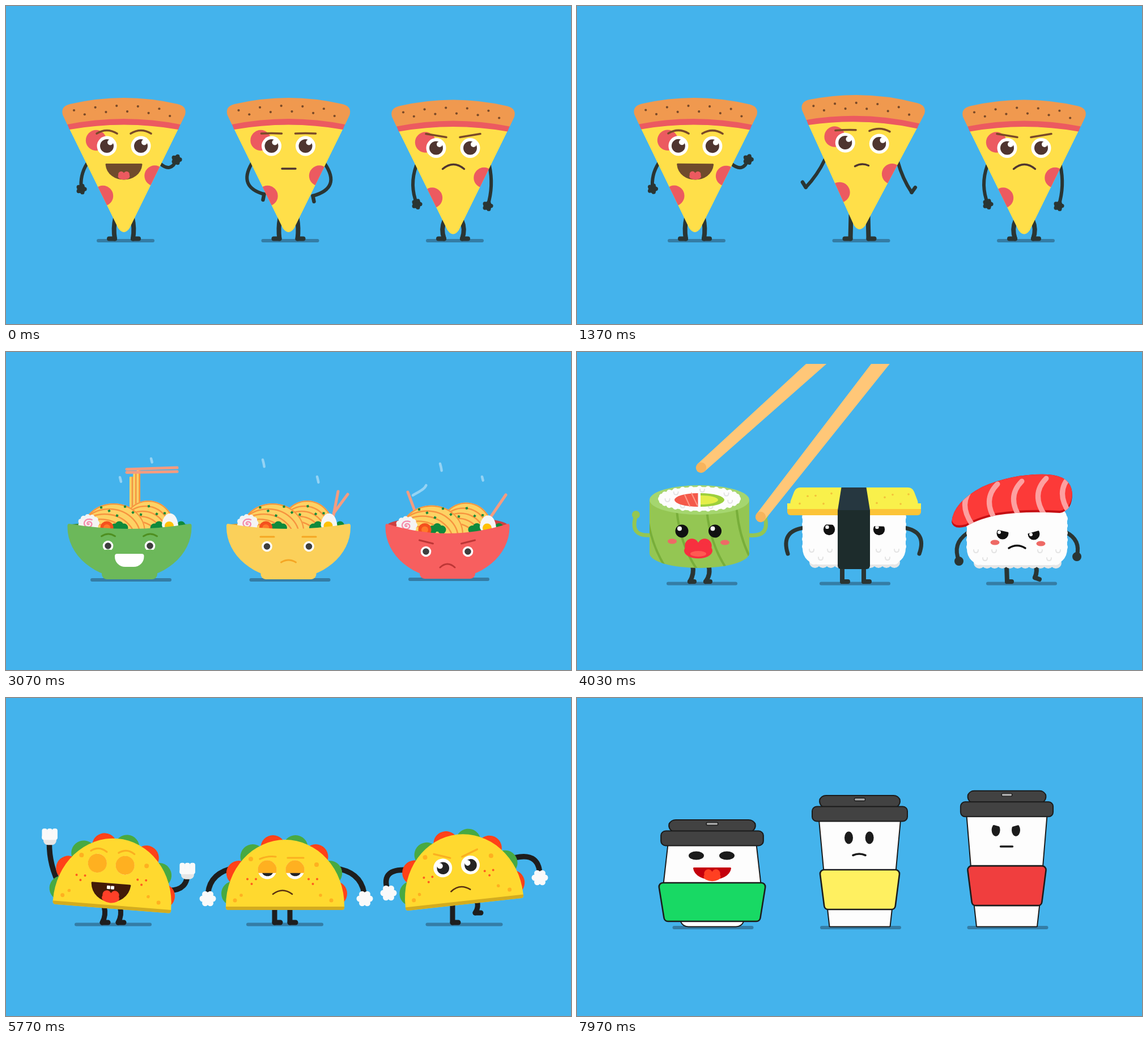
An HTML page with a canvas for the animation above (8000 ms loop, 997 by 561 pixels).

```html
<!DOCTYPE html>
<html lang="en">
<head>
<meta charset="utf-8">
<title>Food moods</title>
<style>
html, body { margin: 0; height: 100%; overflow: hidden; background: #44b3ec; }
canvas { display: block; width: 100vw; height: 100vh; }
</style>
</head>
<body>
<canvas id="stage" width="997" height="561"></canvas>
<script>
const g = document.getElementById('stage').getContext('2d');
const { sin, cos, min, max, PI } = Math;
const SKY = '#44b3ec', DARK = '#2a3533', BLACK = '#1e1e1e', WHITE = '#fdfdfd';
const SIDES = [-1, 1];

// ---- shapes ----
function fill(d, c) { g.fillStyle = c; g.fill(new Path2D(d)); }
function line(d, c, w) {
  g.strokeStyle = c; g.lineWidth = w; g.lineCap = g.lineJoin = 'round';
  g.stroke(new Path2D(d));
}
function oval(x, y, rx, ry, c) {
  g.beginPath(); g.ellipse(x, y, rx, ry, 0, 0, 2 * PI); g.fillStyle = c; g.fill();
}
const dot = (x, y, r, c) => oval(x, y, r, r, c);
function box(x, y, w, h, r, c) {
  g.beginPath(); g.roundRect(x, y, w, h, r); g.fillStyle = c; g.fill();
}
// symmetric trapezoid with half widths a (top) and b (bottom), optionally outlined
function trap(x, y0, y1, a, b, r, c, w) {
  const pts = [[x + a, y0], [x + b, y1], [x - b, y1], [x - a, y0]];
  g.beginPath(); g.moveTo(x, y0);
  pts.forEach((p, i) => g.arcTo(...p, ...(pts[i + 1] || [x, y0]), r));
  g.closePath(); g.fillStyle = c; g.fill();
  if (w) { g.strokeStyle = '#1b1b1b'; g.lineWidth = w; g.stroke(); }
}
const ring = (x, y, rx, ry, n, r, c) => {
  for (let i = 0; i < n; i++) dot(x + rx * cos(i * 2 * PI / n), y + ry * sin(i * 2 * PI / n), r, c);
};
const row = (x0, x1, y0, y1, n, r, c) => {
  for (let i = 0; i < n; i++) dot(mix(x0, x1, i / (n - 1)), mix(y0, y1, i / (n - 1)), r, c);
};
function at(x, y, rot, sx, sy, draw) {
  g.save(); g.translate(x, y); g.rotate(rot); g.scale(sx, sy); draw(); g.restore();
}
const move = (x, y, draw) => at(x, y, 0, 1, 1, draw);
const turn = (x, y, rot, sy, draw) => at(x, y, rot, 1, sy, () => move(-x, -y, draw));
function clip(d, draw) { g.save(); g.clip(new Path2D(d)); draw(); g.restore(); }

// ---- body parts ----
const shadow = (x, y, half) => line(`M${x - half},${y}h${2 * half}`, '#347da6', 6);
// bend pushes the middle sideways by a share of the length
function limb(x0, y0, [x1, y1, bend], c, w) {
  const dx = x1 - x0, dy = y1 - y0;
  line(`M${x0},${y0}Q${x0 + dx / 2 - dy * bend},${y0 + dy / 2 + dx * bend} ${x1},${y1}`, c, w);
}
function leg(x0, y0, x1, y1, bend, c, w, toe = 10, dip = 0) {
  limb(x0, y0, [x1, y1, bend], c, w);
  line(`M${x1},${y1}l${toe},${dip}`, c, w);
}
// brows and mouths: tilt lifts the right end, arch lifts the middle
const curve = (x, y, half, tilt, arch, c, w) =>
  line(`M${x - half},${y + tilt}Q${x},${y - arch} ${x + half},${y - tilt}`, c, w);
function smile(x, y, half, depth, c) {
  const d = `M${x - half},${y}h${2 * half}c${-half * .12},${depth * 1.33} ${-half * 1.88},${depth * 1.33} ${-2 * half},0Z`;
  fill(d, c); line(d, c, 3);
}
function tongue(x, y, r, c) {
  for (const s of SIDES) dot(x + s * r * .45, y - r * .25, r * .5, c);
  oval(x, y + r * .1, r, r * .55, c);
}

// ---- timing ----
const ease = u => u * u * (3 - 2 * u);
const mix = (a, b, u) => Array.isArray(a) ? a.map((v, i) => mix(v, b[i], u)) : a + (b - a) * u;
// key(t, time, value, time, value, ...)
function key(t, ...k) {
  let i = 0;
  while (i < k.length - 2 && t >= k[i + 2]) i += 2;
  if (i >= k.length - 2 || t <= k[0]) return k[i + 1];
  return mix(k[i + 1], k[i + 3], ease((t - k[i]) / (k[i + 2] - k[i])));
}

// ---- pizza ----
const BROWN = '#7a4a28', PINK = '#ec5a60';
const CHEESE = 'M112,217Q208,201 304,217L218,392Q208,406 198,392Z';

function slice({ x, y, rot, bow, arms, stub, brows, mouth }) {
  move(x, 0, () => {
    shadow(211, 414, 48);
    SIDES.forEach(s => leg(208 + 15 * s, 374 + y, 208 + 16 * s, 410.5, -s * bow, DARK, 8, 10 * s));
    move(0, y, () => turn(208, 396, rot, 1, () => {
      arms.forEach((hand, i) => {
        const [hx, hy] = hand;
        limb(i ? 272 : 143, 278, hand, DARK, 6);
        if (stub) return line(`M${hx},${hy}l${SIDES[i] * stub[0]},${stub[1]}`, DARK, 6.5);
        dot(hx, hy, 7.5, DARK);
        ring(hx, hy, 6, 6, 5, 3.6, DARK);
      });
      fill(CHEESE, '#ffdf49');
      clip(CHEESE, () => {
        dot(159, 237, 18.2, PINK); dot(171, 335, 18.2, PINK); dot(262.5, 299.5, 18.2, PINK);
      });
      fill('M108,208Q208,188 308,208L304,218Q208,201 112,218Z', PINK);
      fill('M113,173Q208,151 303,173Q320,177 316,192L308,209Q208,189 108,209L100,192Q96,177 113,173Z', '#f0994f');
      for (let i = 0; i < 10; i++) dot(120 + 18.8 * i, 184 + 10 * (i % 2) - 8 * sin(PI * i / 9), 2.1, BROWN);
      SIDES.forEach((s, i) => {
        const ex = 208 + 30 * s;
        dot(ex, 247, 17.5, '#fff');
        dot(ex, 247, 12, '#4f3530');
        dot(ex + 6, 240.5, 5, '#fff');
        curve(ex, 225, 18, ...brows[i], BROWN, 3.6);
      });
      if (mouth) return curve(208.5, ...mouth, '#4f3530', 3.4);
      smile(208, 279.5, 31, 25.5, '#6f4b2c');
      tongue(208, 299.5, 10.5, PINK);
    }));
  });
}
function pizzas(t) {
  t = min(t, 1670);
  const wave = sin(t / 1670 * 6 * PI);
  const shrug = key(t, 0, 0, 350, 0, 720, 1.6, 950, 1, 1400, 1, 1670, 0);
  const hop = key(t, 0, 0, 160, .2, 400, 1, 700, 0);
  slice({
    x: 0, y: 0, rot: key(t, 0, 0, 420, -.06, 860, .004, 1370, .006, 1670, 0), bow: .1,
    arms: [[133, 323, .18], [301 + 2 * wave, 271 - 4 * wave, .7]],
    brows: [[0, 11], [0, 11]]
  });
  slice({
    x: 290.5, y: -5 * shrug, rot: .032 * shrug, bow: .08 * (1 - shrug),
    arms: mix([[165, 332, .65], [251, 335, -.7]], [[111, 328, -.08], [298, 331, .08]], shrug),
    stub: mix([2, 10], [6, -9], shrug),
    brows: [[shrug, 1], [0, 1 + 8 * shrug]],
    mouth: [287, 12, shrug, 6 * shrug]
  });
  slice({
    x: 581, y: 3.5 - 11 * hop, rot: .06 * hop, bow: .2 * (1 - hop),
    arms: [[144, 346 - 12 * hop, .19], [269, 349 - 12 * hop, -.13]],
    brows: [[-3, 0], [3, 0]],
    mouth: [284, 19, 0, 16]
  });
}

// ---- ramen ----
const GREEN = '#0f8a3c', NOODLE = '#fdd264', BROTH = '#f7943f';

function steam(x, top, u, slant = 0) {
  const tail = max(0, 1.6 * u - .6), head = min(1, 1.6 * u);
  let d = 'M';
  for (let i = 0; i <= 10; i++) {
    const v = mix(tail, head, i / 10);
    d += `${i ? 'L' : ''}${x + slant * v - 3 * sin(v * 2 * PI)},${top + 70 * (1 - v) * (slant ? .42 : 1)}`;
  }
  line(d, '#94d3f4', 4.5);
}
function mound(x, y, rx, ry, shift) {
  oval(x, y, rx, ry, NOODLE);
  g.save();
  g.beginPath(); g.ellipse(x, y, rx, ry, 0, 0, 2 * PI); g.clip();
  g.strokeStyle = BROTH; g.lineWidth = 2.6;
  for (let i = 0; i < 5; i++) {
    g.beginPath(); g.ellipse(x - shift * i, y + 9 * i, rx - 1, ry - 1, 0, 0, 2 * PI); g.stroke();
  }
  g.restore();
}
function toppings() {
  mound(251, 312, 47, 50, 5);
  mound(190, 317, 56, 50, 8);
  for (let i = 0; i < 9; i++) at(168 + 14 * i, 281 + 9 * sin(2.2 * i + 4), i, 1, 1, () => box(-2, -2, 4, 4, 0, '#178a3a'));
  for (const [x, n] of [[192, 3], [262, 3], [301, 2]])
    for (let i = 0; i < n; i++) dot(x + 8 * i, 310 - 4 * (i % 2), 7.5, GREEN);
  dot(178, 310, 11.5, '#f4511e');
  dot(178, 310, 6, '#ff7a2a');
  ring(146, 302, 14, 11, 11, 5, '#f4f4f4');
  oval(146, 303, 15, 13, '#f4f4f4');
  let swirl = 'M';
  for (let a = 0; a < 12; a += .4) swirl += `${a ? 'L' : ''}${146 + .85 * a * cos(a)},${303 + .75 * a * sin(a)}`;
  line(swirl, '#f58cab', 2.3);
  fill('M275,305C277,280 301,276 304,306Q302,315 290,315Q276,315 275,305Z', '#f6f6f6');
  dot(288, 307, 8, '#ffc107');
}
function bowl({ x, color, inner, ink, tilt, eyeY, tilts, arch, sticks = [], lift }) {
  const stick = (x0, y0, x1, y1) => line(`M${x0},${y0}L${x1},${y1}`, '#f59c80', 5);
  move(x, 0, () => {
    shadow(220.5, 402 - tilt, 68.5);
    oval(218, 305, 105, 4 + 10 * tilt, inner);
    sticks.forEach(s => stick(...s));
    if (lift !== undefined) {
      for (let i = 0; i < 3; i++) {
        const top = 220 + lift - 6 * i, sx = 218 + 6.3 * i;
        box(sx, top, 6.3, 275 - top, 1, NOODLE);
        box(sx + 3.6, top, 2.7, 275 - top, 0, BROTH);
      }
      stick(213, 207 + lift, 302, 204 + lift);
      stick(213, 212.5 + lift, 302, 211 + lift);
    }
    move(0, 3.5 * tilt, toppings);
    box(169, 380, 98, 21 - tilt, [0, 0, 9, 9], color);
    fill(`M111,303Q218,${321 + 16 * tilt} 325,303Q328,303 327.500,309A109.500,91 0 0 1 108.500,309Q108,303 111,303Z`, color);
    SIDES.forEach(s => {
      const ex = 217 + 37 * s;
      dot(ex, eyeY, 9.3, '#fff');
      dot(ex, eyeY, 5.8, '#3e3e3e');
      if (lift !== undefined) oval(ex, eyeY + 10, 10, 3.5, color);
      curve(ex + .5, eyeY - 17, 12, s * tilts, arch, ink, 3);
    });
    if (lift !== undefined) return box(192, 356, 51.5, 23, [4, 4, 18, 18], '#fff');
    curve(218, eyeY + 28, 13, 0, 8 + 4 * tilt, ink, 3);
  });
}
function ramen(t) {
  t = min(t, 1640);
  const u = p => (t / 1000 + p) % 1;
  const tilt = key(t, 0, 0, 400, 1, 1300, 1, 1640, 0);
  bowl({
    x: 0, color: '#6cb85a', inner: '#3f8a34', ink: '#4e8f20', tilt: 0, eyeY: 342, tilts: 0, arch: 8,
    lift: key(t, 0, 48, 450, 4, 820, 40, 1240, 0, 1640, 40)
  });
  bowl({
    x: 280.5, color: '#fbd05a', inner: '#d99a2e', ink: '#f5a623', tilt: 0, eyeY: 343, tilts: 0, arch: 0,
    sticks: [[305.5, 246, 297, 290], [322.5, 251, 298, 284]]
  });
  bowl({
    x: 561, color: '#f75f5f', inner: '#cc4040', ink: '#bd3636', tilt, eyeY: 343 + 9 * tilt, tilts: 3, arch: 0,
    sticks: [[148, 247, 161, 282], [321, 252, 295, 290]]
  });
  steam(256, 188, u(.7)); steam(201, 221, u(.69));
  steam(453, 190, u(.65)); steam(549, 220, u(.67));
  steam(766, 197, u(.65)); steam(840, 220, u(.7));
  steam(708, 234, u(.36), 34);
}

// ---- sushi ----
const LIME = '#94c653', BLUSH = '#ee6a66';
const cheeks = (x, y, half) => SIDES.forEach(s => oval(x + s * half, y + s, 8, 4.5, BLUSH));
const grain = (x, y) => line(`M${x},${y}q0,5 4,5q4,0 4,-5`, '#e4e4e4', 2);
const eye = (x, y, r, shine) => { dot(x, y, r, '#111'); dot(x - r * .35, y - r * .4, shine, '#fff'); };

function riceBlock(x, y, w, h) {
  const end = y + h;
  row(x + 22, x + w - 20, end - 4, end - 4, 11, 10, '#e6e6e6');
  box(x, y, w, h, 28, WHITE);
  row(x + 20, x + w - 20, end - 9, end - 9, 11, 9, WHITE);
  for (const side of [x + 6, x + w - 6]) row(side, side, y + 26, end - 32, 5, 7, WHITE);
  for (const side of [x + 12, x + w - 52]) for (let i = 0; i < 3; i++) grain(side + 16 * i, end - 27 + 14 * (i % 2));
}
function roll(b) {
  shadow(220.5, 408.5, 59.5);
  leg(204, 376, 199, 405, -.2, DARK, 8, 8);
  leg(232, 376, 227, 405, -.25, DARK, 8, 8);
  turn(216, 405, .012 * b, 1 + .015 * b, () => {
    const side = 'M128,261V355A88,26 0 0 0 304,355V261Z';
    for (const [x, hx, bend] of [[131, 104 - 7 * b, -.75], [302, 331 + 6 * b, .75]]) {
      limb(x, 323, [hx, 289, bend], LIME, 7);
      dot(hx, 287, 7, LIME);
    }
    fill(side, LIME);
    clip(side, () => {
      for (let i = 0; i < 4; i++) line(`M${123 + 53 * i},280q6,60 36,104`, '#78ae3a', 4);
    });
    oval(216, 261, 88, 26, '#a5d66f');
    oval(216, 259, 72, 21, WHITE);
    ring(216, 259, 68, 18, 28, 5, WHITE);
    for (let i = 0; i < 7; i++) grain(212 + 57 * cos(i * .9 + 3), 257 + 15 * sin(i * .9 + 3));
    clip('M170,240h43.500v40H170Z', () => {
      oval(214, 261, 42, 12, '#f4594a');
      line('M190,252l9,20M202,249l10,21', '#ff9a88', 2);
    });
    clip('M218,240h52v40h-52Z', () => {
      oval(218, 261, 42, 12, '#9ccf3c');
      oval(218, 261, 31, 8, '#e4ee4a');
    });
    eye(185, 316, 11.5, 4); eye(243.5, 316, 11.5, 4);
    cheeks(214.5, 335, 46.5);
    tongue(214, 348, 25, '#f7303f');
    oval(214, 356, 14, 5, '#ff5a52');
  });
}
function tamago(m) {
  shadow(490.5, 408.5, 59.5);
  leg(468, 376, 468, 405, 0, DARK, 8);
  leg(506, 376, 506, 405, 0, DARK, 8);
  turn(489, 405, 0, 1 + .006 * m, () => {
    SIDES.forEach(s => limb(489 + 88 * s, 310, [488 + (116 - 3 * m) * s, 356, -.6 * s], DARK, 7));
    riceBlock(398, 265, 182, 110);
    trap(489, 239, 278, 103, 118, 12, '#f9f04b');
    box(371, 267, 236, 11, 0, '#f9f04b');
    box(371, 277, 236, 11, [0, 0, 6, 6], '#fcc438');
    for (let i = 0; i < 5; i++) SIDES.forEach(s => dot(489 + s * (40 + 14 * i), 258 + 10 * sin(2.3 * i + s), 1.8, '#f3c13a'));
    trap(488.5, 239, 279.5, 22, 28.5, 0, '#263740');
    box(460, 279, 57, 104, [0, 0, 6, 6], '#1d2c2c');
    clip('M430,304L550,308V330H430Z', () => { eye(445, 313, 10.2, 3.2); eye(533, 313, 10.2, 3.2); });
  });
}
function salmon(b, m) {
  const lift = max(0, cos(b * PI / 2)), handX = 882 + 7 * b;
  const fish = 'M661,300Q664,265 715,238Q770,214 830,216Q872,218 874,250Q874,280 852,284Q790,280 740,288Q705,296 686,308Q664,314 661,300Z';
  shadow(784.5, 408.5, 59.5);
  leg(758, 376, 759, 405, 0, DARK, 8, 8);
  leg(809, 374, 808, 405 - 7 * lift, -.2, DARK, 8, 8, 3 * lift);
  turn(776, 400, .008 * b, 1, () => {
    limb(688, 320, [674, 368, .4], DARK, 7); dot(674, 369, 8, DARK);
    limb(863, 318, [handX, 360, -.4], DARK, 7); dot(handX, 361, 8, DARK);
    riceBlock(688, 268, 177, 108);
    fill(fish, '#c50f14');
    clip(fish, () => {
      move(0, -4, () => fill(fish, '#fc3a38'));
      for (let i = 0; i < 5; i++) line(`M${699 + 43 * i},${238 - 5 * i}q-28,28 -2,66`, '#fda0a0', 9);
    });
    clip('M735,312L766,319L790,322L822,313V336H735Z', () => {
      eye(751, 320, 10.5, 0); eye(806, 321, 10.5, 0);
      dot(745 + m, 318, 3, '#fff'); dot(801 + m, 322, 3, '#fff');
    });
    cheeks(778, 337, 40.5);
    curve(776.5, 346, 14.5, 0, 9, '#111', 3.4);
  });
}
function chopstick(x, y, rot, off) {
  at(x, y, rot, 1, 1, () => move(0, -330 * off, () => {
    trap(0, -800, 0, 18, 9, 0, '#ffc778');
    dot(0, 0, 9.2, '#f8b45c');
  }));
}
function sushi(t) {
  const b = sin((min(t, 1630) - 430) / 400 * PI), m = sin((min(t, 1830) - 430) / 350 * PI);
  const off = key(t, 0, 1, 400, 0, 1050, 0, 1600, 1);
  roll(b);
  tamago(m);
  salmon(b, m);
  clip('M0,21H997V561H0Z', () => {
    chopstick(219, 204, .837, off);
    chopstick(324, 291, .664, off * 1.1);
  });
}

// ---- taco ----
const GOLD = '#ffb020';
const SHELL = 'M392,374Q387,374 388,366A104.500,116 0 0 1 597,366Q598,374 593,374Z';

function glove(x, y, up) {
  if (!up) {
    dot(x, y, 11, '#fafafa');
    return ring(x, y, 9, 9, 6, 5.5, '#fafafa');
  }
  box(x - 11, y - 4, 23, 19, 8, '#e6e6e6');
  for (let i = 0; i < 3; i++) box(x - 13.5 + 9 * i, y - 14, 9.5, 20, 4, '#fafafa');
  box(x - 13.5, y - 3, 26, 9, 4, '#fafafa');
}
function filling() {
  for (let i = 0; i < 8; i++) {
    const a = PI * (1 - i / 7);
    dot(491 + 89 * cos(a), 345 - 83 * sin(a), 22, i % 2 ? '#ff4218' : '#48a942');
  }
}
function tacoFace({ face, lid, brows, happy }) {
  SIDES.forEach((s, i) => {
    const x = 485.5 + 24.5 * s;
    dot(x, face, 16.5, '#fff');
    dot(x + .5, face + .5, 10.8, '#242424');
    dot(x - 4.5, face - 4, 5, '#fff');
    clip(`M${x - 18},${face - 17}h36v${34 * lid}h-36Z`, () => dot(x, face, 16.7, GOLD));
    curve(x + 1, face - 21, 14, ...brows[i], '#fbaf20', 3.2);
  });
  if (!happy) return curve(488, face + 43, 17, 0, 13, '#5a3010', 2.6);
  smile(488, face + 35, 33.5, 30, '#431a08');
  for (const x of [481, 488]) box(x, face + 38, 6, 6, 1, '#fff');
  tongue(489, face + 58, 15.5, '#ff4028');
}
function taco(o) {
  const { x, y, rot, arms, happy } = o, drop = happy ? 40 : 72;
  shadow(o.ground, 399.5, 65);
  o.legs.forEach(l => leg(...l, BLACK, 9));
  // shoulders follow the body
  arms.forEach((hand, i) => limb(
    x + 98 * SIDES[i] * cos(rot) + drop * sin(rot), y - drop * cos(rot) + 98 * SIDES[i] * sin(rot), hand, BLACK, 9.5));
  at(x, y, rot, 1, 1, () => move(-492, -374, () => {
    filling();
    fill(SHELL, '#ffd92f');
    clip(SHELL, () => box(380, 368, 225, 8, 0, '#d3ac1f'));
    SIDES.forEach(s => {
      dot(490 + 58 * s, 289 + 5 * s, 4, GOLD);
      dot(489 + 85 * s, 357, 3.5, GOLD);
      dot(485 + 70 * s, 348, 2.8, GOLD);
      for (let i = -1; i < 2; i++) dot(487.5 + 54 * s + 7.5 * i, 328 - 8.5 * i * i, 2, '#ff5a1f');
    });
    tacoFace(o);
  }));
  arms.forEach(([hx, hy]) => glove(hx, hy, happy));
}
function tacos(t) {
  const sway = .5 - .5 * cos((t - 150) / 390 * PI);
  const hips = key(t, 0, 0, 350, 0, 850, 1, 1450, 1, 1800, 0);
  const stomp = key(t, 0, 1, 200, 1, 420, 0, 760, 0, 980, 1, 1080, 1, 1250, 0);
  const hipX = mix(3, 12, sway), knee = mix(-.2, -.3, sway);
  taco({
    ground: 189, happy: true, x: mix(186, 192, sway), y: mix(371.5, 375, sway), rot: mix(.08, -.065, sway), face: 296,
    lid: key(t, 0, 0, 110, 1, 210, 1, 330, 0),
    legs: [[170 + hipX, 368, 170, 396, knee], [198 + hipX, 368, 198, 396, knee]],
    arms: mix([[77, 244, -.13], [320, 305, .55]], [[65, 285, -.3], [305, 253, .2]], sway),
    brows: [[0, 10], [0, 10]]
  });
  taco({
    ground: 492, x: 492, y: 374 - 8 * hips, rot: 0, face: 303 - 7.5 * hips,
    lid: key(t, 0, .25, 150, .67, 330, .67, 550, .25),
    legs: [[474, 364, 474, 396, 0], [501, 364, 501, 396, 0]],
    arms: mix([[356, 354, .38], [633, 354, -.38]], [[388, 343, .9], [593, 342, -.95]], hips),
    brows: [[2 + 3 * hips, 4], [0, 0]]
  });
  const lifted = mix([818, 368, 822, 396, 0], [831, 358, 828, 379, -.25], stomp);
  taco({
    ground: 808.5, x: mix(806, 809, stomp), y: mix(374, 364, stomp), rot: mix(.018, -.11, stomp), face: 306, lid: 0,
    legs: [[788, 360, 788, 396, 0], lifted],
    arms: mix([[676, 369, .2], [942, 375, -.18]], [[675, 344, .75], [942, 317, -.65]], stomp),
    brows: [[-5, 0], [5, 0]]
  });
}

// ---- coffee cups ----
const INK = '#1b1b1b', LID = '#424242';
// q above 0 squashes, below 0 stretches
function cup(x, q, color, face) {
  const p = max(q, 0), n = min(q, 0);
  const top = 215 + 43 * q, sleeve = 303 + 23 * p + 36 * n, half = 71 + 24 * p + 5 * n;
  move(x, 0, () => {
    shadow(1.5, 405, 68.5);
    trap(0, 345, 403.5, 60 + 18 * p, 53.5 - 2 * p, 1 + 14 * p, WHITE, 2);
    trap(0, top, sleeve + 20, 72 + 6 * p + 5 * n, 62 + 26 * p, 1, WHITE, 2);
    trap(0, sleeve, sleeve + 70 - 2 * p, half, half - 9 - 2 * p, 7, color, 2.6);
    at(0, 43 * q, 0, 1 + .075 * p + .15 * n, 1, () => {
      trap(0, 172, 194, 68, 76, 12, LID, 2);
      trap(0, 191.5, 217.5, 84, 84, 8, LID, 2);
      trap(0, 176.5, 181.5, 9.5, 9.5, 2, '#aaa', 1.4);
    });
    face(p);
  });
}
function cups(t) {
  cup(238.5, key(t, 0, 0, 280, -.18, 570, 1), '#18d964', p => {
    SIDES.forEach(s => oval(-1 + s * (18.5 + 8.5 * p), 246 + 32 * p, 7.5 + 6 * p, 11 - 3.5 * p, INK));
    at(0, 257 + 43 * p, 0, .8 + .2 * p, 1, () => {
      smile(0, .5, 32, 18.5, '#c4000c');
      tongue(0, 13.5, 15, '#ff4022');
    });
  });
  cup(499, 0, '#fff060', () => {
    SIDES.forEach(s => oval(-1.2 + 18.3 * s, 246.5, 7.5, 11, INK));
    curve(-1, 277.5, 11, 0, 5, INK, 3.6);
  });
  cup(758.5, key(t, 0, 0, 350, -.19), '#f03e3e', () => {
    clip('M-34,221L-1,230L32,221V250H-34Z', () => SIDES.forEach(s => oval(-1.7 + 17.7 * s, 233, 7.5, 11, INK)));
    curve(-.5, 262, 10.5, 0, 0, INK, 3.4);
  });
}

const scenes = [[0, pizzas], [1830, ramen], [3600, sushi], [5600, tacos], [7400, cups]];
function frame() {
  const t = performance.now() % 8000;
  const [start, draw] = scenes.filter(s => s[0] <= t).pop();
  g.fillStyle = SKY;
  g.fillRect(0, 0, 997, 561);
  draw(t - start);
  requestAnimationFrame(frame);
}
frame();
</script>
</body>
</html>
```
